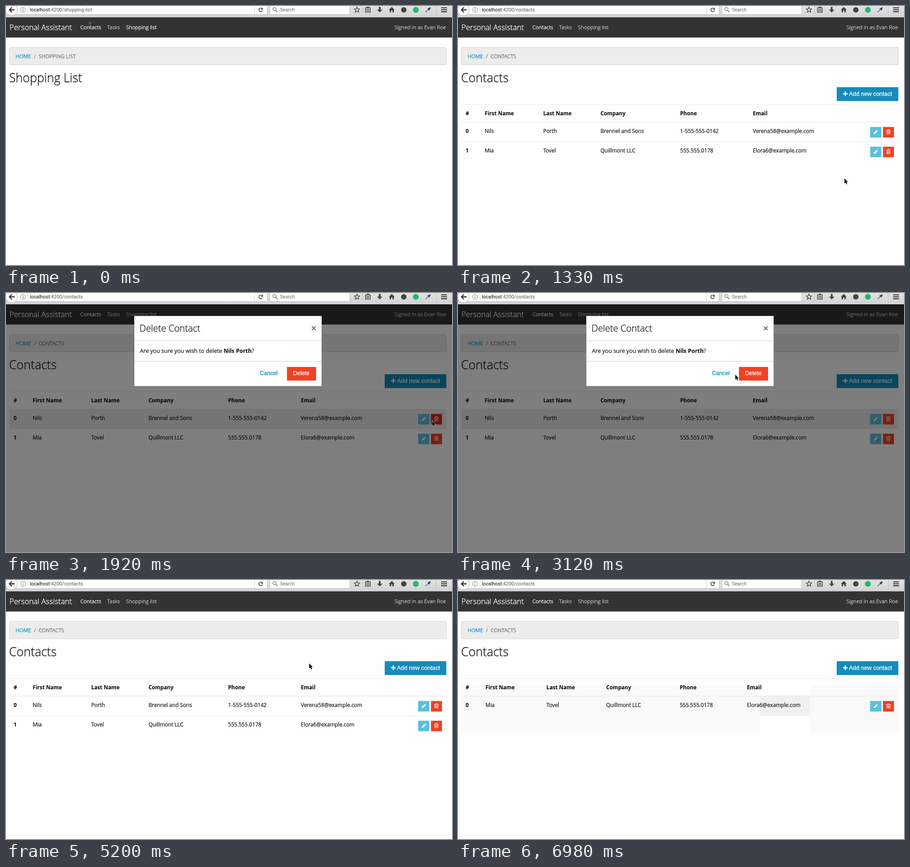
An HTML page for the animation above (7.38 s loop, 981x571 px).

```html
<!DOCTYPE html>
<html lang="en">
<head>
<meta charset="utf-8">
<title>Personal Assistant</title>
<style>
  html, body { margin: 0; width: 100%; height: 100%; overflow: hidden; background: #fefefe; }
  svg { display: block; width: 981px; height: 571px; font-family: "Open Sans", sans-serif; }
  /* A hairline in the text colour gives the heavier smoothing of a desktop browser. */
  text { stroke-width: .2px; }
  .light { font-weight: 300; stroke-width: .36px; }
  .bold { font-weight: 700; stroke-width: .1px; }
  .button { font-family: "Liberation Sans", Arial, sans-serif; stroke-width: .3px; }
  .chrome { font-family: Roboto, sans-serif; stroke-width: .1px; }
</style>
</head>
<body>
<svg id="stage" viewBox="0 0 981 571"></svg>
<script>
const LOOP = 7380;
const BODY = 11.7;
const HEADERS = ['#', 'First Name', 'Last Name', 'Company', 'Phone', 'Email'];
const PEOPLE = [
  ['Nils', 'Porth', 'Brennel and Sons', '1-555-555-0142', 'Verena58@example.com'],
  ['Mia', 'Tovel', 'Quillmont LLC', '555.555.0178', 'Elora6@example.com']
];
const WIDE_COLUMNS = [16.8, 58.8, 187.4, 313.4, 488.5, 648.5];
const NARROW_COLUMNS = [16.8, 60.6, 194.6, 326, 487.7, 635.5];

// Each step: start time, pointer x, pointer y, changes that stay until overridden.
const STEPS = [
  [0, 185, 43, { page: 'shopping', pointer: 'beam', row: -1, people: PEOPLE, columns: WIDE_COLUMNS }],
  [150, 188, 46],
  [300, 192, 48, { page: 'contacts' }],
  [450, 225, 78, { pointer: 'arrow' }],
  [590, 430, 205],
  [740, 655, 316, { row: 1 }],
  [890, 766, 365, { tint: 'rows' }],
  [1040, 790, 402],
  [1190, 800, 419],
  [1330, 850, 380, { tint: '', row: -1 }],
  [1480, 906, 322, { row: 1 }],
  [1630, 934, 287, { row: 0 }],
  [1770, 937.5, 282, { trash: true }],
  [1920, 937.5, 282, { modal: true }],
  [2070, 937.5, 282, { trash: false }],
  [2670, 890, 262],
  [2820, 780, 222],
  [2970, 672, 187, { hot: 'delete' }],
  [3120, 610, 180, { hot: '' }],
  [3270, 581, 178, { hot: 'cancel' }],
  [3710, 586, 179],
  [3860, 606, 181, { hot: '' }],
  [4010, 638, 183, { hot: 'delete' }],
  [4160, 658, 183],
  [4310, 667, 184],
  [5200, 667, 184, { modal: false, hot: '', row: -1 }],
  [5650, 667, 184, { people: PEOPLE.slice(1), columns: NARROW_COLUMNS, tint: 'table' }],
  [6690, 761, 446, { tint: 'trail' }],
  [6840, 887, 522],
  [6980, 0, 0, { pointer: 'none' }]
];

const rect = (x, y, w, h, fill, extra = '') =>
  `<rect x="${x}" y="${y}" width="${w}" height="${h}" fill="${fill}" ${extra}/>`;
const text = (x, y, words, size, fill = '#111', style = '', extra = '') =>
  `<text x="${x}" y="${y}" font-size="${size}" fill="${fill}" stroke="${fill}" class="${style}" ${extra}>${words}</text>`;
const path = (d, fill, extra = '') => `<path d="${d}" fill="${fill}" ${extra}/>`;
const line = (d, stroke, width = 1, extra = '') =>
  path(d, 'none', `stroke="${stroke}" stroke-width="${width}" ${extra}`);
const circle = (x, y, r, fill, extra = '') => `<circle cx="${x}" cy="${y}" r="${r}" fill="${fill}" ${extra}/>`;
const at = (x, y, content) => `<g transform="translate(${x} ${y})">${content}</g>`;

function browserBar(page) {
  const ink = '#444';
  const address = page === 'shopping' ? 'shopping-list' : 'contacts';
  const star = Array.from({ length: 10 }, (_, i) => {
    const r = i % 2 ? 2.8 : 6.2, a = i * Math.PI / 5;
    return `${(772 + r * Math.sin(a)).toFixed(1)},${(8.5 - r * Math.cos(a)).toFixed(1)}`;
  }).join(' ');
  return `<linearGradient id="bar" x2="0" y2="1"><stop stop-color="#e2e2e2"/><stop offset="1" stop-color="#d2d2d2"/></linearGradient>`
    + rect(0, 0, 981, 25, 'url(#bar)')
    + rect(14, -3, 560.5, 21.5, '#fff', 'stroke="#c4c4c4"')
    + rect(580.5, -3, 175.5, 21.5, '#fff', 'stroke="#c4c4c4"')
    + circle(12, 8.5, 13, '#fcfcfc', 'stroke="#b2b2b2"')
    + line('M19 8.5H8M13 3L7.5 8.5L13 14', '#333', 2.3)
    + circle(37.5, 8.5, 5.5, 'none', 'stroke="#777"') + line('M37.5 7.5V11.5M37.5 5V6.3', '#666', 1.3)
    + line('M48.5 2V16M546.5 0V18', '#d0d0d0')
    + text(52.5, 12.3, `localhost<tspan fill="#666" stroke="#666">:4200/${address}</tspan>`, 10.75, '#222', 'chrome')
    + line('M563.4 6A4 4 0 1 0 564 10', ink, 1.7) + path('M565 3.5V8.2H560.3Z', ink)
    + circle(590.5, 6.8, 3.5, 'none', 'stroke="#888" stroke-width="1.5"') + line('M593 9.5L597 13.5', '#888', 1.8)
    + text(602.5, 12.3, 'Search', 10.6, '#777', 'chrome')
    + `<polygon points="${star}" fill="none" stroke="${ink}" stroke-width="1.4"/>`
    + line('M784.5 0V17M946.5 0V22', '#bdbdbd')
    + rect(790.7, 4, 10.6, 9.6, 'none', `stroke="${ink}" stroke-width="1.5"`)
    + line('M793 3H799', ink, 2.4) + line('M792.5 7.5H799.5M792.5 10.5H799.5', ink, 1.3)
    + path('M820 2H824V8H828L822 14L816 8H820Z', ink)
    + path('M848.5 2L855 8.5H853V14H850V10H847V14H844V8.5H842Z', ink)
    + circle(875, 8.5, 6, ink)
    + circle(901.5, 8.5, 6.5, '#20b976')
    + line('M923 13.5L929 7.5', '#6c8bad', 2.4) + line('M928 5L932 9M930 7L933.5 3.5', '#34405c', 2.9)
    + line('M957 4H970M957 8.3H970M957 12.6H970', '#333', 2.1);
}

function navigation(page, overLink) {
  const link = (x, words, active) => text(x, 51.3, words, BODY, active ? '#fff' : '#c6c6c6', 'light');
  return rect(0, 25, 981, 44.5, '#333')
    + text(7.6, 53.3, 'Personal Assistant', 16.8, '#fff', 'light')
    + link(163.5, 'Contacts', page === 'contacts' || overLink)
    + link(222.5, 'Tasks', false)
    + link(264, 'Shopping list', page === 'shopping')
    + text(968, 51.3, 'Signed in as Evan Roe', BODY, '#c6c6c6', 'light', 'text-anchor="end"');
}

function heading(title) {
  return rect(7.5, 91.5, 961, 38, '#ececec', 'rx="2" stroke="#d2d2d2"')
    + text(21, 115.2, 'HOME', BODY, '#008cba', 'light')
    + text(61.5, 115.2, '/', BODY, '#666', 'light')
    + text(71.7, 115.2, title.toUpperCase(), BODY, '#666', 'light')
    + text(6.7, 167.6, title, 26.6, '#1a1a1a', 'light');
}

const pencil = path('M-4.5 4.5L-3.8 1.5L1.6 -3.9L4 -1.5L-1.4 3.9ZM2.3 -4.5L3.2 -5.2L5.2 -3.2L4.6 -2.2Z', '#fff');
const trash = line('M-5 -3H5M-1.8 -3.2V-5H1.8V-3.2M-3.5 -2.8V4.6H3.5V-2.8M-1.5 -.8V2.8M0 -.8V2.8M1.5 -.8V2.8', '#fff', 1);

function contactRow(person, index, state) {
  const top = 256.5 + index * 43.5;
  const hovered = state.row === index;
  const cells = [index, ...person].map((value, i) =>
    text(state.columns[i], top + 23.1, value, BODY, '#111', i ? '' : 'bold')).join('');
  return (hovered ? rect(7.5, top, 961, 43.5, '#ececec') : '')
    + (index ? line(`M8 ${top - .2}H969`, '#ececec') : '')
    + cells
    + rect(906.5, top + 10.2, 24.7, 23.2, '#5bc0de') + at(918.8, top + 21.4, pencil)
    + rect(934.7, top + 10.2, 24.2, 23.2, hovered && state.trash ? '#d32a0e' : '#f04124') + at(946.7, top + 21, trash);
}

function tints(kind) {
  if (kind === 'rows') return rect(8, 256, 961, 124, '#f8f8f8');
  if (kind === 'table') return rect(8, 232, 961, 102, '#f9f9f9');
  if (kind === 'trail') return tints('table') + rect(664, 185, 110, 277, '#fefefe') + rect(664, 256, 110, 43.5, '#f0f0f0');
  return '';
}

function contacts(state) {
  return heading('Contacts')
    + tints(state.tint)
    + rect(833, 179, 135.5, 30.5, '#158cba')
    + line('M847 193.5H857M852 188.5V198.5', '#fff', 2.7)
    + text(860, 198, 'Add new contact', 12.8, '#fff', 'button')
    + line('M8 217.5H969', '#ececec')
    + line('M8 256H969', '#ececec', 1.6)
    + HEADERS.map((name, i) => text(state.columns[i], 241, name, BODY, '#111', 'bold')).join('')
    + state.people.map((person, i) => contactRow(person, i, state)).join('');
}

function dialog(hot) {
  const cancel = hot === 'cancel' ? ['#00526e', 'text-decoration="underline"'] : ['#008cba', ''];
  return rect(0, 25, 981, 546, '#000', 'opacity=".5"')
    + rect(282, 50.5, 412.5, 155, '#fff', 'stroke="#000" stroke-opacity=".25"')
    + text(293.8, 85, 'Delete Contact', 20.1, '#1a1a1a', 'light')
    + line('M673 73.7L681 81.7M681 73.7L673 81.7', '#7c7c7c', 2.5)
    + line('M282.5 105.5H694M282.5 150.5H694', '#cfcfcf')
    + text(294.5, 132, 'Are you sure you wish to delete <tspan class="bold">Nils Porth</tspan>?', 12.4)
    + text(558.5, 181.3, 'Cancel', 12.5, cancel[0], 'button', cancel[1])
    + rect(618, 163, 64, 30, hot === 'delete' ? '#d32a0e' : '#f04124')
    + text(631.5, 181.3, 'Delete', 12.5, '#fff', 'button');
}

const POINTERS = {
  none: '',
  beam: line('M-3.5 -6Q0 -6 0 -3.5Q0 -6 3.5 -6M0 -4V4M-3.5 6Q0 6 0 3.5Q0 6 3.5 6M-2 2H2', '#8a8a8a'),
  arrow: path('M0 0V11.2L2.5 8.9L4.2 13L6 12.2L4.3 8.2H7.6Z', '#000', 'stroke="#fff" stroke-width="1.2" paint-order="stroke"')
};

const states = [];
for (const [time, x, y, changes] of STEPS) {
  states.push({ ...states.at(-1), ...changes, time, x, y });
}

const stage = document.getElementById('stage');
let shown;

function draw(state) {
  stage.innerHTML = rect(0, 0, 981, 571, '#fefefe')
    + navigation(state.page, state.pointer === 'beam')
    + (state.page === 'shopping' ? heading('Shopping List') : contacts(state))
    + (state.modal ? dialog(state.hot) : '')
    + browserBar(state.page)
    + at(state.x, state.y, POINTERS[state.pointer]);
}

function tick() {
  const time = performance.now() % LOOP;
  const state = states.findLast(step => step.time <= time);
  if (state !== shown) draw(shown = state);
  requestAnimationFrame(tick);
}
tick();
</script>
</body>
</html>
```
